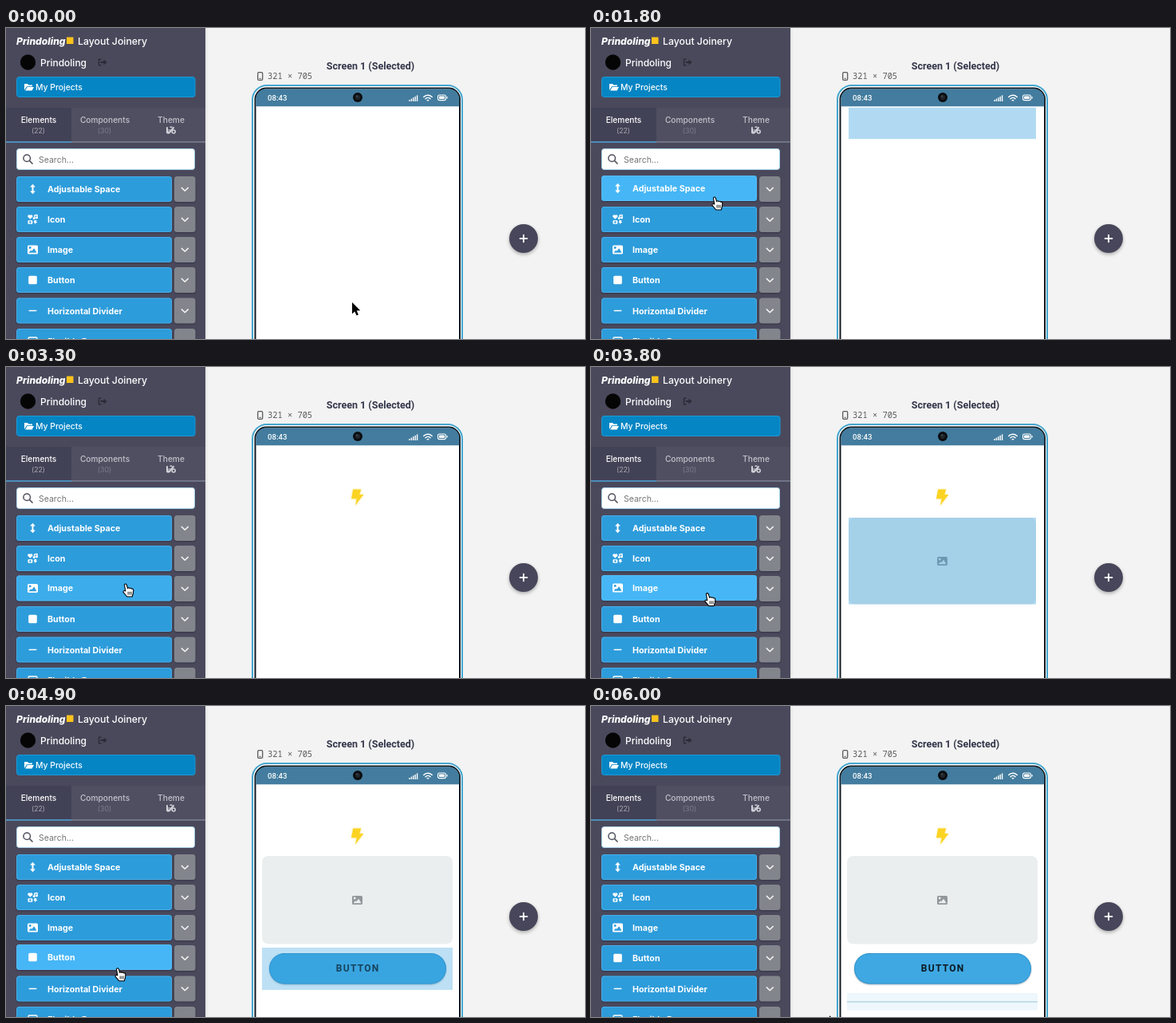
An HTML page with a canvas that plays this animation: 726 by 390 pixels, repeating every 6.1 s.

```html
<!DOCTYPE html>
<html lang="en">
<head>
<meta charset="utf-8">
<title>Layout Joinery</title>
<style>
html, body { margin: 0; width: 100%; height: 100%; overflow: hidden; background: #f3f3f3; }
canvas { display: block; width: 726px; height: 390px; }
</style>
</head>
<body>
<canvas id="stage"></canvas>
<script>
const W = 726, H = 390, LOOP = 6100, STEP = 100;
const canvas = document.getElementById('stage');
const ctx = canvas.getContext('2d');
const dpr = window.devicePixelRatio || 1;
canvas.width = W * dpr;
canvas.height = H * dpr;

const INTER = 'Inter, sans-serif', ROBOTO = 'Roboto, sans-serif', MONO = '"Noto Sans Mono", monospace';
const BLUE = '#2d9cdb';

// Cursor path: time, x, y of the hot spot
const PATH = [
  [0, 434, 344], [400, 434, 344], [1300, 158, 205], [1600, 156, 206], [1800, 155, 212],
  [2300, 155, 239], [2500, 155, 241], [2700, 155, 241], [3100, 152, 255], [3300, 150, 272],
  [3500, 148, 277], [3700, 147, 278], [4300, 141, 312], [4650, 141, 312],
  [5200, 139, 349], [5550, 139, 349], [6000, 299, 388], [6100, 310, 392]
];
const CLICKS = [1450, 2500, 3500, 4400, 5300];
const CLICK_TIME = 200;
const SHOW = { space: 1700, icon: 2800, image: 3700, button: 4700, divider: 5600 };

const ROWS = [
  ['Adjustable Space', 186, arrowsIcon], ['Icon', 224, shapesIcon], ['Image', 262, pictureIcon],
  ['Button', 300, squareIcon], ['Horizontal Divider', 338.5, dashIcon], ['Flexible Box', 377, frameIcon]
];

const clamp = v => Math.max(0, Math.min(1, v));
const mix = (a, b, k) => a + (b - a) * k;
const blend = (a, b, k) => `rgb(${a.map((v, i) => Math.round(mix(v, b[i], k))).join()})`;

function cursorAt(t) {
  let i = 1;
  while (i < PATH.length - 1 && PATH[i][0] < t) i++;
  const [t0, x0, y0] = PATH[i - 1], [t1, x1, y1] = PATH[i];
  const k = clamp((t - t0) / (t1 - t0)), e = k * k * (3 - 2 * k);
  const ease = Math.hypot(x1 - x0, y1 - y0) > 100 ? e : k;
  return [mix(x0, x1, ease), mix(y0, y1, ease)];
}

function over(t, top) {
  const [x, y] = cursorAt(Math.max(0, t));
  return x > 13 && x < 208 && y >= top && y < top + 32;
}

// Linear 200 ms hover transition
function hoverAmount(t, top) {
  let n = 0;
  for (let i = 0; i < 10; i++) n += over(t - i * 20, top);
  return n / 10;
}

function text(str, x, y, font, color, align = 'left', spacing = 0) {
  ctx.font = font;
  ctx.fillStyle = color;
  ctx.textAlign = align;
  ctx.textBaseline = 'alphabetic';
  ctx.letterSpacing = spacing + 'px';
  ctx.fillText(str, x, y);
}

function rect(x, y, w, h, fill) {
  ctx.fillStyle = fill;
  ctx.fillRect(x, y, w, h);
}

function box(x, y, w, h, r, fill, stroke, line = 1) {
  ctx.beginPath();
  ctx.roundRect(x, y, w, h, r);
  if (fill) { ctx.fillStyle = fill; ctx.fill(); }
  if (stroke) { ctx.strokeStyle = stroke; ctx.lineWidth = line; ctx.stroke(); }
}

function disc(x, y, r, fill) {
  ctx.beginPath();
  ctx.arc(x, y, r, 0, 7);
  ctx.fillStyle = fill;
  ctx.fill();
}

function ring(x, y, r, color, width) {
  ctx.beginPath();
  ctx.arc(x, y, r, 0, 7);
  ctx.strokeStyle = color;
  ctx.lineWidth = width;
  ctx.stroke();
}

function poly(points, fill) {
  ctx.beginPath();
  for (const [x, y] of points) ctx.lineTo(x, y);
  ctx.closePath();
  if (fill) { ctx.fillStyle = fill; ctx.fill(); }
}

function line(points, color, width) {
  ctx.beginPath();
  for (const [x, y] of points) ctx.lineTo(x, y);
  ctx.strokeStyle = color;
  ctx.lineWidth = width;
  ctx.lineCap = ctx.lineJoin = 'round';
  ctx.stroke();
}

function shadow(color, blur, dy = 0) {
  ctx.shadowColor = color;
  ctx.shadowBlur = blur * dpr;
  ctx.shadowOffsetY = dy * dpr;
}
const noShadow = () => shadow('transparent', 0);

// Row icons, centred on x, y
function arrowsIcon(x, y) {
  rect(x - 1, y - 4, 2, 8, '#fff');
  poly([[x - 3.4, y - 2.5], [x, y - 6.2], [x + 3.4, y - 2.5]], '#fff');
  poly([[x - 3.4, y + 2.5], [x, y + 6.2], [x + 3.4, y + 2.5]], '#fff');
}
function shapesIcon(x, y) {
  disc(x - 4.5, y - 4, 1.8, '#fff');
  disc(x - 1.8, y - 4, 1.8, '#fff');
  poly([[x - 6.2, y - 3.4], [x - 0.1, y - 3.4], [x - 3.2, y - 0.3]], '#fff');
  line([[x + 2.3, y - 1.3], [x + 2.3, y - 5], [x + 5.6, y - 5.6], [x + 5.6, y - 2]], '#fff', 1.3);
  disc(x + 1.6, y - 1.3, 1.4, '#fff');
  disc(x + 4.9, y - 2, 1.4, '#fff');
  box(x - 6, y + 1.2, 5.8, 4.6, 1, '#fff');
  disc(x - 3.1, y + 3.5, 1.2, BLUE);
  poly([[x + 2, y + 1], [x + 5, y + 1], [x + 4.2, y + 3], [x + 6, y + 3], [x + 2, y + 6.6], [x + 3, y + 4.2], [x + 1.3, y + 4.2]], '#fff');
}
function pictureIcon(x, y, color = '#fff', hole = BLUE) {
  box(x - 6.5, y - 5.5, 13, 11, 1.6, color);
  disc(x - 3.3, y - 2.5, 1.4, hole);
  poly([[x - 5, y + 3.8], [x - 2.4, y + 0.8], [x - 1.2, y + 1.8], [x + 1.7, y - 1.8], [x + 5, y + 3.8]], hole);
}
function squareIcon(x, y) { box(x - 5.3, y - 5.3, 10.6, 10.6, 1.6, '#fff'); }
function dashIcon(x, y) { box(x - 5, y - 0.8, 10, 1.6, 0.8, '#fff'); }
function frameIcon(x, y) { box(x - 5.5, y - 5, 11, 10, 1.5, null, '#fff', 1.4); }

function drawHeader() {
  text('Prindoling', 13, 20.5, `italic 800 12.1px ${INTER}`, '#fff');
  rect(76, 11.5, 8.5, 8.5, '#fbc31c');
  text('Layout Joinery', 90, 20.5, `500 12.3px ${INTER}`, '#fff');
  disc(27.5, 43, 9.7, '#050505');
  text('Prindoling', 43, 47.5, `500 12px ${INTER}`, '#fff');

  const dark = '#2b2b38';
  line([[119, 39.2], [116.5, 39.2], [116.5, 46.8], [119, 46.8]], dark, 1.4);
  line([[119.5, 43], [123, 43]], dark, 2.2);
  poly([[122.5, 39.4], [126.6, 43], [122.5, 46.6]], dark);

  box(13.5, 61.5, 223.5, 25, 3, '#0585c4', '#1d9ad6');
  poly([[23, 78], [23, 70], [27, 70], [28.5, 71.5], [33, 71.5], [33, 73.3], [26, 73.3]], '#fff');
  poly([[26.6, 74], [35, 74], [32.6, 78.6], [24.2, 78.6]], '#fff');
  text('My Projects', 37, 77.5, `500 10.4px ${INTER}`, '#fff');
}

function drawTabs() {
  rect(0, 100, 250, 43, '#504f61');
  rect(0, 100, 82, 43, '#424256');
  rect(0, 142.3, 250, 1.3, '#83889a');
  rect(0, 142.3, 82, 1.3, '#3a9ed8');
  const tab = `500 10.2px ${INTER}`, count = `400 8.8px ${INTER}`;
  text('Elements', 41, 118.5, tab, '#fff', 'center');
  text('(22)', 40.5, 131.5, count, '#a5a5b2', 'center');
  text('Components', 124, 118.5, tab, '#c3c3cd', 'center');
  text('(30)', 123.5, 131.5, count, '#7c7b8c', 'center');
  text('Theme', 207, 118.5, tab, '#c3c3cd', 'center');

  const c = '#d0d0d8';
  line([[202, 125], [202, 131]], c, 2);
  line([[204.5, 131.5], [210, 125]], c, 2);
  line([[202, 128], [206, 128]], c, 1.2);
  disc(203, 131, 1.7, c);
  ring(210.2, 130, 2, c, 1.6);
  line([[206, 124.2], [208, 124.2]], c, 1.4);

  box(13.5, 151.5, 223, 26, 3, '#fff', '#a9d5ee');
  ring(26.2, 163.2, 4.3, '#50505c', 1.5);
  line([[29.5, 166.5], [33, 170]], '#50505c', 1.7);
  text('Search...', 41, 168.5, `400 10.5px ${INTER}`, '#747474');
}

function drawRow(t, [label, top, icon]) {
  const h = hoverAmount(t, top), y = top - h;
  shadow('rgba(20,20,35,.4)', 2, 1);
  box(13, y, 195, 32, 3.5, blend([45, 156, 219], [70, 182, 246], h));
  box(211, top, 26.5, 32, 3.5, '#82858b');
  noShadow();
  box(13.5, y + 0.5, 194, 31, 3, null, 'rgba(105,195,245,.45)');
  icon(33.5, y + 16);
  text(label, 52, y + 20, `700 10.7px ${INTER}`, '#fff');
  line([[220.3, top + 14.4], [224.3, top + 18.3], [228.3, top + 14.4]], '#f2f2f2', 1.5);
}

function drawSidebar(t) {
  shadow('rgba(0,0,0,.18)', 4);
  rect(0, 0, 250, H, '#4a495c');
  noShadow();
  drawHeader();
  drawTabs();
  for (const row of ROWS) drawRow(t, row);
}

function drawPhone() {
  text('Screen 1 (Selected)', 457, 51.5, `700 12.5px ${ROBOTO}`, '#34364a', 'center');
  box(315.7, 55.7, 6, 9.6, 1.3, null, '#5a5a5a', 1.3);
  rect(317.5, 62.8, 2.4, 1, '#5a5a5a');
  text('321 × 705', 328, 64, `400 10.4px ${MONO}`, '#5a5a5a');

  box(309, 72, 263, 400, 18, '#fff', '#44a5cd', 2);
  box(312.5, 75.5, 256.5, 400, 14, '#fff', '#111820', 2);
  ctx.save();
  ctx.beginPath();
  ctx.roundRect(313.3, 76.3, 255, 400, 13);
  ctx.clip();
  rect(313, 76, 256, 22.3, '#437c9e');
  ctx.restore();

  text('08:43', 328, 90.8, `500 9.6px ${ROBOTO}`, '#fff');
  disc(441, 87, 6, '#0b0d10');
  disc(441, 87, 3, '#20262c');
  disc(440, 85.5, 1, '#4a545c');
  for (let i = 0; i < 5; i++) rect(505.3 + i * 2.4, 90 - i * 1.4, 1.4, 2 + i * 1.4, '#fff');
  for (let i = 0; i < 3; i++) {
    ctx.beginPath();
    ctx.arc(529, 91.5, 1 + i * 3.1, -Math.PI * 0.76, -Math.PI * 0.24);
    ctx.strokeStyle = '#fff';
    ctx.lineWidth = 1.5;
    ctx.stroke();
  }
  box(541.5, 84, 10, 6.6, 2, null, '#fff', 1.1);
  box(543, 85.5, 7, 3.6, 0.8, '#fff');
  rect(552.6, 86, 1.1, 2.6, '#fff');
}

// Pops a block in, then lets its tint fade
function block(t, start, y, h, draw) {
  const age = t - start;
  if (age < 0) return;
  const scale = mix(0.966, 1, clamp(age / 200));
  const tint = 0.37 * clamp(1 - (age - 150) / 320);
  ctx.save();
  ctx.translate(440.5, y + h / 2);
  ctx.scale(scale, scale);
  ctx.translate(-440.5, -y - h / 2);
  if (draw) draw();
  if (tint) {
    ctx.globalAlpha = tint;
    rect(321, y, 239, h, BLUE);
  }
  ctx.restore();
}

function drawBolt() {
  shadow('rgba(251,210,31,.5)', 3);
  poly([[435.2, 153.5], [445.2, 153.5], [443.2, 160], [448.3, 160], [437.8, 173.8], [439.8, 165.3], [433, 165.3]], '#fbd323');
  noShadow();
}

function drawPlaceholder() {
  box(321, 188, 239, 110.5, 8, '#eaeeef');
  pictureIcon(440.5, 243.5, '#92979a', '#eaeeef');
}

function drawButton() {
  shadow('rgba(20,60,90,.4)', 2, 1);
  box(330, 310, 222, 38.5, 19.2, '#3fa8e2');
  noShadow();
  box(330.5, 310.5, 221, 37.5, 18.7, null, 'rgba(30,125,180,.45)');
  text('BUTTON', 441.2, 332.5, `700 12px ${ROBOTO}`, '#0b1a24', 'center', 1.3);
}

function drawContent(t) {
  block(t, SHOW.space, 99.5, 40, null);
  block(t, SHOW.icon, 143, 41, drawBolt);
  block(t, SHOW.image, 188, 110.5, drawPlaceholder);
  block(t, SHOW.button, 303, 53, drawButton);
  block(t, SHOW.divider, 360, 21.5, () => rect(321, 370.2, 239, 1.5, '#c3dce4'));
}

function drawAdd() {
  shadow('rgba(0,0,0,.3)', 4, 2);
  disc(649, 264, 18, '#47465a');
  noShadow();
  line([[644.7, 264], [653.3, 264]], '#fff', 2);
  line([[649, 259.7], [649, 268.3]], '#fff', 2);
}

function drawArrow() {
  poly([[0, 0], [0, 14.4], [3.3, 11.5], [5.5, 16.6], [7.9, 15.6], [5.7, 10.5], [10.2, 10.2]]);
  ctx.strokeStyle = '#fff';
  ctx.lineWidth = 2;
  ctx.stroke();
  ctx.fillStyle = '#000';
  ctx.fill();
}

function drawHand() {
  ctx.beginPath();
  ctx.moveTo(-1.6, 1);
  ctx.quadraticCurveTo(-0.2, -1, 1.2, 1);
  ctx.lineTo(2.6, 5.6);
  ctx.quadraticCurveTo(4, 4, 5.2, 5.6);
  ctx.quadraticCurveTo(6.8, 4.6, 7.6, 6.2);
  ctx.quadraticCurveTo(9.6, 5.6, 9.8, 8);
  ctx.lineTo(9.4, 12);
  ctx.lineTo(8.2, 16);
  ctx.lineTo(1.8, 16);
  ctx.lineTo(-3, 10.3);
  ctx.quadraticCurveTo(-3.2, 7.6, -0.2, 9);
  ctx.closePath();
  ctx.fillStyle = '#fff';
  ctx.fill();
  ctx.strokeStyle = '#000';
  ctx.lineWidth = 1.1;
  ctx.lineJoin = 'round';
  ctx.stroke();
  for (let i = 0; i < 3; i++) line([[3 + i * 2, 10], [3.1 + i * 2, 13.3]], '#000', 0.8);
}

function drawCursor(t) {
  const [x, y] = cursorAt(t);
  const hand = ROWS.some(([, top]) => over(t, top - 3)) || (x < 208 && y > 186 && t < 5600);
  if (CLICKS.some(c => t >= c && t < c + CLICK_TIME)) {
    ring(x, y, 30.3, 'rgba(255,255,255,.8)', 3.6);
    ring(x, y, 30.3, '#101418', 1.7);
  }
  ctx.save();
  ctx.translate(x, y);
  hand ? drawHand() : drawArrow();
  ctx.restore();
}

function render(now) {
  const t = Math.floor((now % LOOP) / STEP) * STEP;
  ctx.setTransform(dpr, 0, 0, dpr, 0, 0);
  rect(0, 0, W, H, '#f3f3f3');
  drawPhone();
  drawContent(t);
  drawAdd();
  drawSidebar(t);
  drawCursor(t);
}

const start = performance.now();
function tick() {
  render(performance.now() - start);
  requestAnimationFrame(tick);
}
tick();
</script>
</body>
</html>
```
